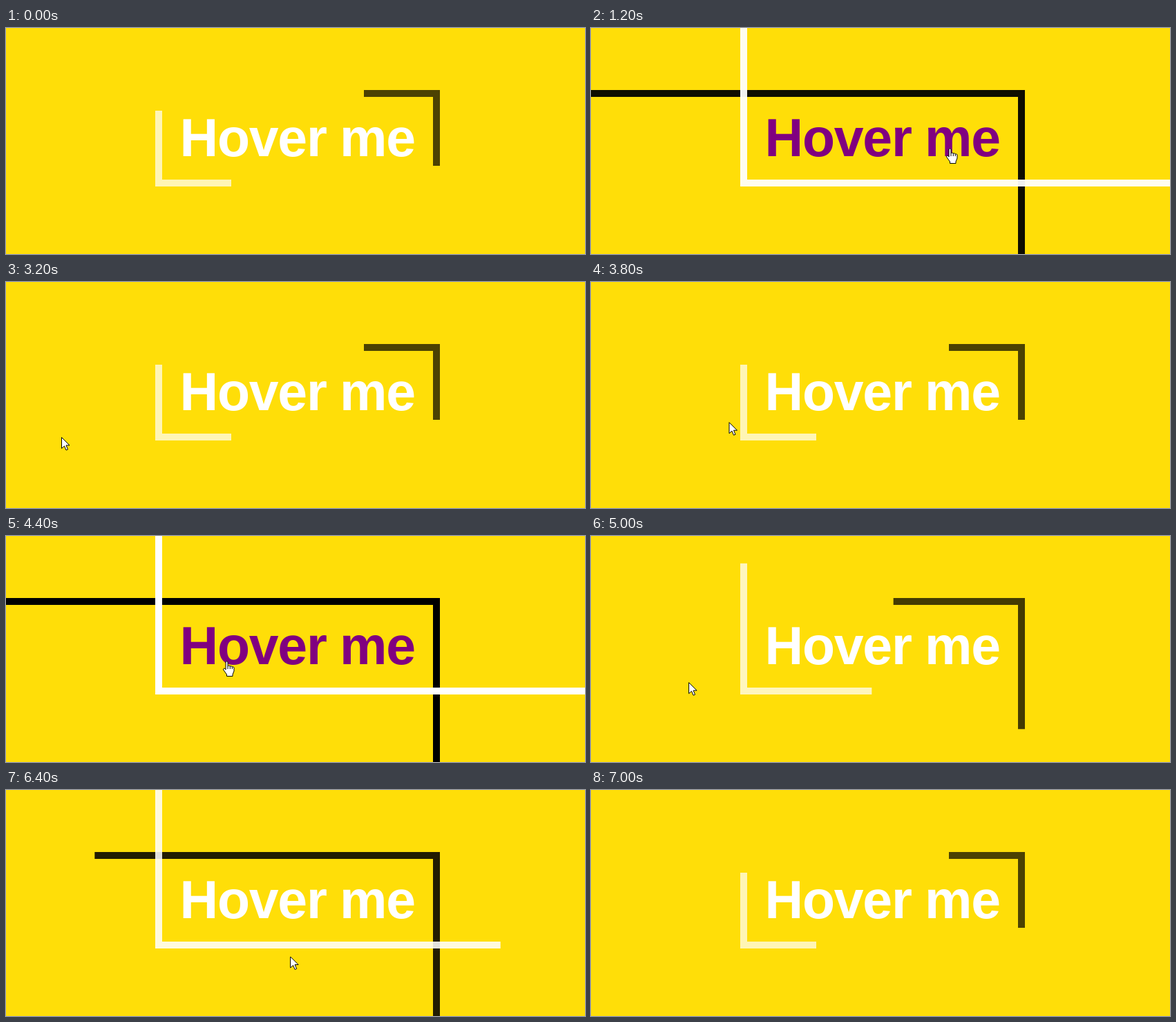
Recreate the animation shown at these times as an HTML page. Size 838 by 328 pixels, loop 7.4 s.

```html
<!DOCTYPE html>
<html lang="en">
<head>
<meta charset="utf-8">
<title>Hover me</title>
<style>
  html, body { margin: 0; width: 100%; height: 100%; overflow: hidden; background: #ffde08; }
  svg { display: block; width: 838px; height: 328px; }
  text {
    font: bold 77px "Liberation Sans", Arial, sans-serif;
    letter-spacing: -1.2px;
    word-spacing: -1px;
  }
</style>
</head>
<body>
<svg viewBox="0 0 838 328">
  <rect width="838" height="328" fill="#ffde08"/>
  <text id="label" x="251.5" y="186">Hover me</text>
  <path id="dark" fill="none" stroke="#000" stroke-width="10"/>
  <path id="light" fill="none" stroke="#fff" stroke-width="10"/>
  <g id="cursor" fill="#fff" stroke="#000" stroke-linejoin="round">
    <path id="arrow" d="M0 0V16L4 12.5 6.5 18.5 9 17.5 6.5 11.5H11.5Z"/>
    <g id="hand">
      <path d="M-1.5 12V1Q0-1.5 1.5 1V7Q3 5 4.8 7 6.5 6 7.8 8 9.5 7 10.5 9V14L8.5 19V21.5H0V19L-5 12Q-4 8-1.5 12Z"/>
      <path d="M1.5 7V11M4.8 7V11M7.8 8V11" fill="none"/>
    </g>
  </g>
</svg>
<script>
const LOOP = 7400, STEP = 200, TRANSITION = 500;
const SMALL = 110, LARGE = 810;

// The pointer alternately enters and leaves the button at these times.
const crossings = [950, 2145, 3850, 4700, 5300, 6267];

const stops = [
  { t: 600, x: 560, y: 318 },
  { t: 1200, x: 519.5, y: 175 },
  { t: 1700, x: 519.5, y: 175 },
  { t: 2200, x: 79.5, y: 225.5 },
  { t: 3200, x: 80.5, y: 225.5 },
  { t: 4400, x: 319.5, y: 182 },
  { t: 4900, x: 130, y: 215 },
  { t: 5600, x: 339.5, y: 173 },
  { t: 6600, x: 420, y: 250 }
];

const $ = id => document.getElementById(id);
const show = (id, on) => $(id).setAttribute("visibility", on ? "visible" : "hidden");
const mix = (a, b, k) => a + (b - a) * k;
const smooth = k => k * k * (3 - 2 * k);
const bezier = (p1, p2, u) =>
  3 * (1 - u) * (1 - u) * u * p1 + 3 * (1 - u) * u * u * p2 + u * u * u;

// The CSS "ease" curve, cubic-bezier(.25, .1, .25, 1).
function ease(x) {
  if (x >= 1) return 1;
  let low = 0, high = 1;
  for (let i = 0; i < 24; i++) {
    const mid = (low + high) / 2;
    if (bezier(.25, .25, mid) < x) low = mid; else high = mid;
  }
  return bezier(.1, 1, low);
}

function pointerAt(t) {
  const next = stops.findIndex(stop => stop.t >= t);
  if (next < 0 || t < stops[0].t) return null;
  const a = stops[Math.max(next - 1, 0)], b = stops[next];
  const k = a === b ? 1 : smooth((t - a.t) / (b.t - a.t));
  return [mix(a.x, b.x, k), mix(a.y, b.y, k)];
}

function draw(t) {
  const past = crossings.filter(c => c <= t);
  const hovered = past.length % 2 === 1;
  const progress = past.length ? ease((t - past.at(-1)) / TRANSITION) : 1;
  const open = hovered ? progress : 1 - progress;
  const size = mix(SMALL, LARGE, open);

  $("dark").setAttribute("d", `M${628 - size} 95H623V${90 + size}`);
  $("light").setAttribute("d", `M221 ${230 - size}V225H${216 + size}`);
  for (const id of ["dark", "light"]) $(id).setAttribute("opacity", mix(.7, 1, open));
  $("label").setAttribute("fill", hovered ? "#800080" : "#fff");

  const pointer = pointerAt(t);
  show("arrow", pointer && !hovered);
  show("hand", pointer && hovered);
  if (pointer) $("cursor").setAttribute("transform", `translate(${pointer})`);
}

const start = performance.now();
function tick() {
  const t = (performance.now() - start) % LOOP;
  draw(Math.floor(t / STEP) * STEP);
  requestAnimationFrame(tick);
}
tick();
</script>
</body>
</html>
```
